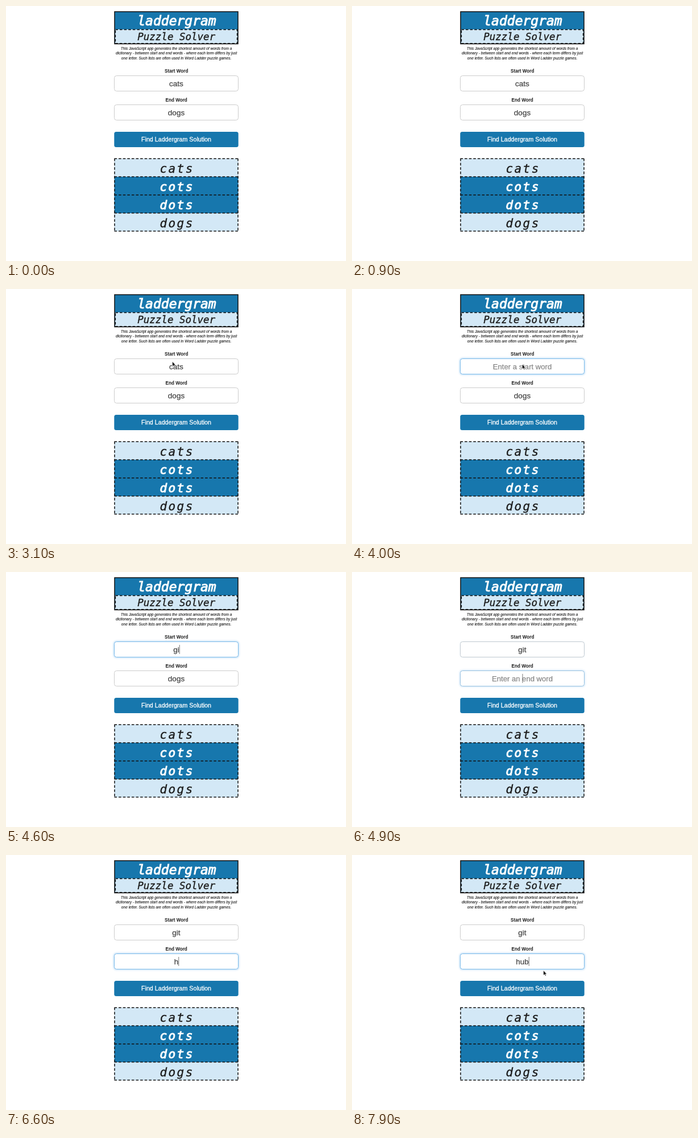
Animation of 598x448 px, one loop 8000 ms. Source, as an HTML page:

```html
<!DOCTYPE html>
<html lang="en">
<head>
<meta charset="utf-8">
<title>Laddergram solver</title>
<style>
html, body { margin: 0; width: 100%; height: 100%; overflow: hidden; background: #fff; }
svg { display: block; width: 598px; height: 448px; }
text { text-anchor: middle; font-family: "Liberation Sans", Arial, sans-serif; fill: #1c1c1c; }
.mono { font-family: "DejaVu Sans Mono", monospace; font-style: italic; stroke: #1c1c1c; stroke-width: .35px; }
.strong { fill: #fff; stroke: #fff; stroke-width: 1px; }
.note { font-size: 6.57px; font-style: italic; stroke: #1c1c1c; stroke-width: .12px; }
.label { font-size: 8.15px; font-weight: bold; }
.button { font-size: 10.7px; fill: #fff; stroke: #fff; stroke-width: .3px; }
.value { font-size: 13.5px; fill: #444; stroke: #444; stroke-width: .25px; }
.hint { font-size: 13.1px; fill: #888; stroke: #888; stroke-width: .25px; }
.word { font-size: 21px; letter-spacing: 2.4px; }
.blue { fill: #1777ad; }
.pale { fill: #d3e8f6; }
.dash { fill: none; stroke: #111; stroke-width: 1.5px; stroke-dasharray: 4.6 3; }
</style>
</head>
<body>
<svg viewBox="0 0 598 448">
  <defs>
    <filter id="blur" x="-10%" y="-40%" width="120%" height="180%"><feGaussianBlur stdDeviation="1.7"/></filter>
  </defs>
  <rect class="blue" x="191" y="10" width="217" height="56.5"/>
  <rect class="pale" x="192" y="41" width="215" height="25"/>
  <rect x="191" y="10" width="217" height="56.5" fill="none" stroke="#111" stroke-width="1.5"/>
  <rect class="dash" x="192.4" y="41.4" width="214.2" height="24.4"/>
  <text class="mono strong" x="300.5" y="34" font-size="23">laddergram</text>
  <text class="mono" x="299.7" y="59.5" font-size="17.5">Puzzle Solver</text>
  <text class="note" x="299.6" y="76.5">This JavaScript app generates the shortest amount of words from a</text>
  <text class="note" x="299.6" y="85.3">dictionary - between start and end words - where each term differs by just</text>
  <text class="note" x="299.6" y="94">one letter. Such lists are often used in Word Ladder puzzle games.</text>
  <text class="label" x="299.7" y="116.8">Start Word</text>
  <text class="label" x="299.7" y="167.6">End Word</text>
  <g id="fields"></g>
  <rect class="blue" x="190.3" y="221" width="218.4" height="27" rx="3.5"/>
  <text class="button" x="299.5" y="238.4">Find Laddergram Solution</text>
  <g id="ladder"></g>
  <path id="mouse" d="M0 0V8.6L2 6.9L3.4 9.9L4.8 9.2L3.5 6.4H6.1Z" fill="#111" stroke="#fff" stroke-width=".7"/>
</svg>
<script>
const NS = "http://www.w3.org/2000/svg", MID = 299.5, LOOP = 8000;
const $ = id => document.getElementById(id);

function add(parent, tag, attrs, text = "") {
  const el = document.createElementNS(NS, tag);
  for (const k in attrs) el.setAttribute(k, attrs[k]);
  el.textContent = text;
  return parent.appendChild(el);
}

["cats", "cots", "dots", "dogs"].forEach((word, i) => {
  const inner = i === 1 || i === 2, y = 268 + 32 * i;
  add($("ladder"), "rect", { class: inner ? "blue" : "pale", x: 190.5, y, width: 218, height: 32 });
  add($("ladder"), "text", { class: "mono word" + (inner ? " strong" : ""), x: 300.6, y: y + 25 }, word);
});
for (let i = 0; i < 5; i++)
  add($("ladder"), "path", { class: "dash", d: `M190.5 ${268.3 + 31.8 * i}H408.5` });
for (const x of [191, 408]) add($("ladder"), "path", { class: "dash", d: `M${x} 268V396` });

function makeField(y, hint) {
  const g = $("fields"), box = { x: 190.5, y, width: 218, height: 27, rx: 4 };
  return {
    hint,
    glow: add(g, "rect", { ...box, fill: "none", stroke: "#66afe9", "stroke-width": 3, filter: "url(#blur)" }),
    edge: add(g, "rect", { ...box, fill: "#fff" }),
    mark: add(g, "rect", { x: 287, y: y + 5.5, width: 25.5, height: 16, fill: "#b3d7fd" }),
    text: add(g, "text", { x: MID, y: y + 18.3 }),
    caret: add(g, "rect", { y: y + 5.5, width: 1, height: 16, fill: "#777" })
  };
}
const start = makeField(122.5, "Enter a start word"), end = makeField(173.5, "Enter an end word");

function showField(f, value, focus, caret, marked) {
  const mix = (a, b) => Math.round(a + (b - a) * focus);
  f.glow.style.opacity = .45 * focus;
  f.edge.setAttribute("stroke", `rgb(${mix(204, 125)},${mix(204, 187)},${mix(204, 234)})`);
  f.mark.style.opacity = marked ? 1 : 0;
  f.text.textContent = value || f.hint;
  f.text.setAttribute("class", value ? "value" : "hint");
  f.caret.setAttribute("x", MID + (value ? f.text.getComputedTextLength() / 2 : 0));
  f.caret.style.opacity = caret ? 1 : 0;
}

// Value of the last [time, value] pair reached
const at = (t, steps) => steps.reduce((v, [time, next]) => t >= time ? next : v, steps[0][1]);
const ramp = (t, from, to) => Math.min(1, Math.max(0, (t - from) / (to - from)));

const startText = [[0, "cats"], [4000, ""], [4300, "g"], [4500, "gi"], [4700, "git"]];
const endText = [[0, "dogs"], [4850, ""], [6600, "h"], [6700, "hu"], [6900, "hub"]];
const startCaret = [[0, 0], [4100, 1], [4800, 0]];
const endCaret = [[0, 0], [4850, 1], [5500, 0], [6000, 1], [6500, 0], [6600, 1], [7400, 0], [7900, 1]];
const path = [[1900, 27, 150], [2300, 247.6, 95.8], [2700, 270, 112], [3200, 298, 131],
  [4000, 299.3, 132], [7600, 299.3, 132], [7900, 336.6, 202.8], [8000, 337, 203]];

function moveMouse(t) {
  const seen = t >= 1900 && t < 4100 || t >= 7700;
  $("mouse").style.opacity = seen ? 1 : 0;
  if (!seen) return;
  const i = path.findIndex(p => p[0] > t), [t0, x0, y0] = path[i - 1], [t1, x1, y1] = path[i];
  const k = ramp(t, t0, t1);
  $("mouse").setAttribute("transform", `translate(${x0 + (x1 - x0) * k} ${y0 + (y1 - y0) * k})`);
}

function draw(now) {
  const t = now % LOOP;
  showField(start, at(t, startText), ramp(t, 3150, 3300) - ramp(t, 4770, 4920), at(t, startCaret), t >= 3250 && t < 4000);
  showField(end, at(t, endText), ramp(t, 4800, 4950), at(t, endCaret), false);
  moveMouse(t);
  requestAnimationFrame(draw);
}
draw(0);
</script>
</body>
</html>
```
